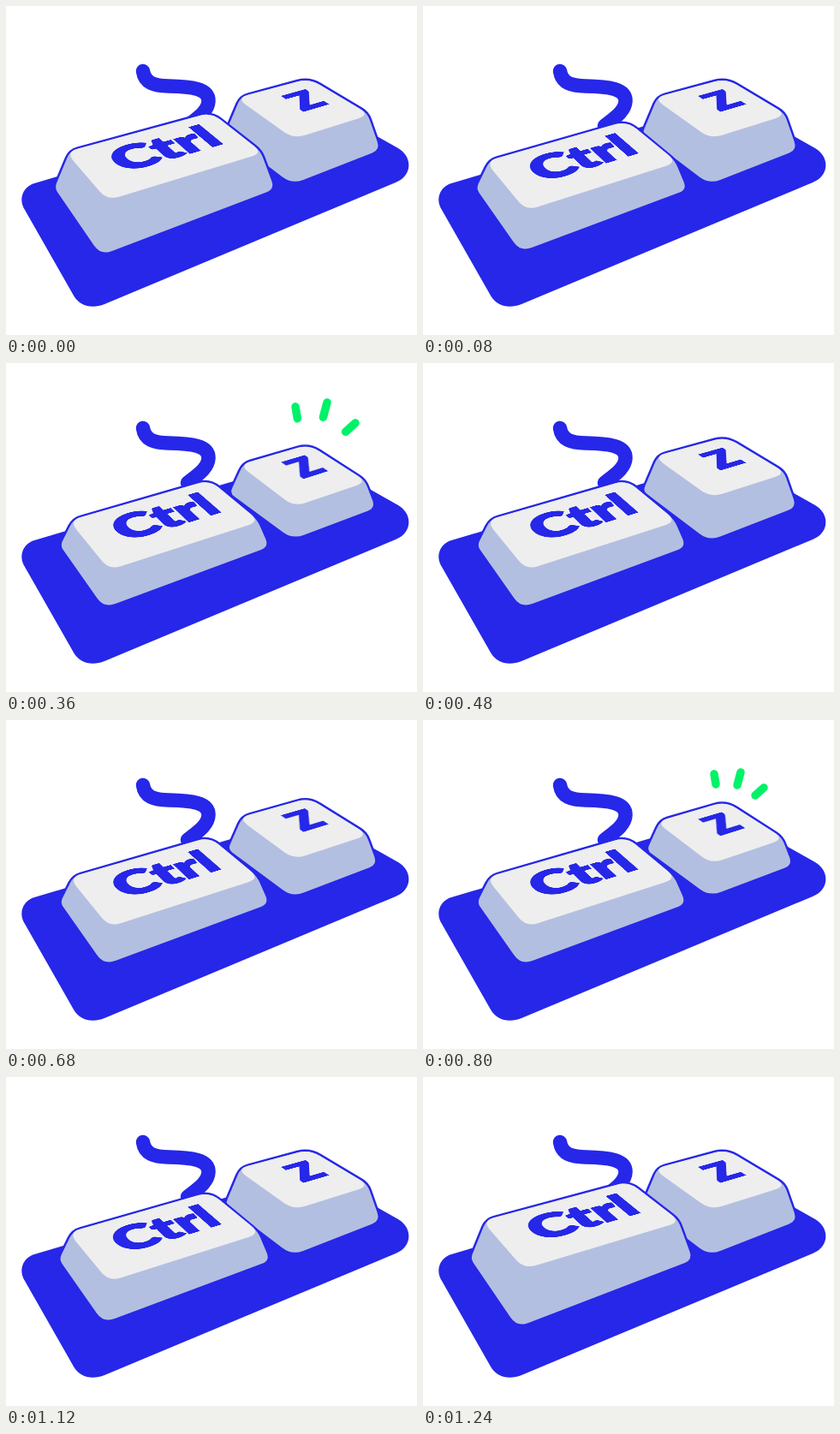
An HTML page for the animation above (1280 ms loop, 480x384 px).

```html
<!DOCTYPE html>
<html lang="en">
<head>
<meta charset="utf-8">
<title>Ctrl Z</title>
<style>
  html, body { margin: 0; width: 100%; height: 100%; overflow: hidden; background: #fff; }
  svg { position: absolute; left: 0; top: 0; }
  .base { fill: #2627e8; }
  .side { fill: #b3bfe1; stroke: #2627e8; stroke-width: 5; stroke-linejoin: round; paint-order: stroke; }
  .face { fill: #eee; }
  .cable { fill: none; stroke: #2627e8; stroke-width: 16.5; stroke-linecap: round; }
  .spark { stroke: #00f268; stroke-width: 9.5; stroke-linecap: round; }
  .label {
    position: absolute; left: 0; top: 0; box-sizing: border-box;
    transform-origin: 0 0; text-align: center; white-space: nowrap;
    font-family: Lato, sans-serif; font-weight: 900;
    color: #2627e8; -webkit-text-stroke: 2px #2627e8;
  }
  #ctrlLabel { width: 160px; height: 104px; padding-left: 10px; font-size: 65px; line-height: 85px; }
  #zLabel { width: 96px; height: 104px; padding-left: 22px; font-size: 56px; line-height: 82px; }
</style>
</head>
<body>
<svg id="stage" width="480" height="384" viewBox="0 0 480 384">
  <path class="base" d="M33 207 L350 113 Q365 109 380 122 L458 166 C475 176 475 198 455 206 L115 348 C100 354 86 350 79 338 L22 238 C14 225 20 211 33 207Z"/>
  <path class="cable" d="M160 76 C162 90 173 93 190 93.500 C216 94 237 96 236.500 111 C236 123 223 131 212 140"/>
</svg>
<div class="label" id="ctrlLabel">Ctrl</div>
<div class="label" id="zLabel">Z</div>
<script>
const LOOP = 1280, STEP = 40;
const stage = document.getElementById('stage');

function ramp(time, start, duration) {
  const k = Math.min(1, Math.max(0, (time - start) / duration));
  return k * k * (3 - 2 * k);
}

// Raised keys. Face corners: left, back, right, front. Foot corners: left, right, front.
const keys = [
  {
    label: document.getElementById('zLabel'), size: [96, 104],
    face: [[269, 107.5], [354, 84.6], [425, 127], [336, 155]],
    foot: [[256, 149], [437, 168], [334, 208]],
    center: [347, 182], drop: 13.5,
    press: t => ramp(t, 240, 120) - ramp(t, 360, 160) + ramp(t, 520, 280) - ramp(t, 800, 160)
  },
  {
    label: document.getElementById('ctrlLabel'), size: [160, 104],
    face: [[69, 168], [240, 122], [301, 169], [118, 224]],
    foot: [[55.5, 212], [315, 213.5], [110, 292]],
    center: [185, 225], drop: 17.6,
    press: t => ramp(t, -40, 160) - ramp(t, 1080, 160)
  }
];

const sparks = [
  { from: [342, 75], reach: [-2, -12] },
  { from: [367, 76], reach: [4, -15] },
  { from: [388, 88], reach: [10, -9] }
];
const bursts = [280, 800], burstSteps = 4;

function add(tag, className) {
  const node = document.createElementNS('http://www.w3.org/2000/svg', tag);
  node.setAttribute('class', className);
  return stage.appendChild(node);
}

for (const key of keys) {
  key.sideNode = add('path', 'side');
  key.faceNode = add('path', 'face');
}
for (const spark of sparks) spark.node = add('line', 'spark');

const mix = (a, b, k) => a + (b - a) * k;
const scaleAbout = (points, [cx, cy], sx, sy, dy = 0) =>
  points.map(([x, y]) => [mix(cx, x, sx), mix(cy, y, sy) + dy]);

// Closed polygon whose corners are cut back by the third value of each point.
function rounded(points) {
  const toward = (p, q) => {
    const k = p[2] / Math.hypot(q[0] - p[0], q[1] - p[1]);
    return mix(p[0], q[0], k).toFixed(2) + ' ' + mix(p[1], q[1], k).toFixed(2);
  };
  const count = points.length;
  return points.map((p, i) => {
    const before = points[(i + count - 1) % count], after = points[(i + 1) % count];
    return `${i ? 'L' : 'M'}${toward(p, before)} Q${p[0]} ${p[1]} ${toward(p, after)}`;
  }).join(' ') + 'Z';
}

// Perspective from a width by height box onto a four-cornered face.
function project([width, height], [[x0, y0], [x1, y1], [x2, y2], [x3, y3]]) {
  const dx1 = x1 - x2, dx2 = x3 - x2, sx = x0 - x1 + x2 - x3;
  const dy1 = y1 - y2, dy2 = y3 - y2, sy = y0 - y1 + y2 - y3;
  const det = dx1 * dy2 - dx2 * dy1;
  const g = (sx * dy2 - dx2 * sy) / det, h = (dx1 * sy - sx * dy1) / det;
  const across = [x1 - x0 + g * x1, y1 - y0 + g * y1, 0, g].map(v => v / width);
  const along = [x3 - x0 + h * x3, y3 - y0 + h * y3, 0, h].map(v => v / height);
  const all = [...across, ...along, 0, 0, 1, 0, x0, y0, 0, 1];
  return `matrix3d(${all.map(v => v.toFixed(8)).join(',')})`;
}

function drawKey(key, time) {
  const k = key.press(time);
  const face = scaleAbout(key.face, key.center, 1 - .04 * k, 1 + .03 * k, key.drop * k);
  const [footLeft, footRight, footFront] =
    scaleAbout(key.foot, key.center, 1 - .06 * k, 1 - .09 * k);
  const [left, back, right] = face;
  const corner = ([x, y], cut, dx = 0, dy = 0) => [x + dx, y + dy, cut];

  key.sideNode.setAttribute('d', rounded([
    corner(footLeft, 6), corner(left, 9, 5, -1.3), corner(back, 14),
    corner(right, 8, -3, -2), corner(footRight, 10), corner(footFront, 14)
  ]));
  key.faceNode.setAttribute('d', rounded(face.map(p => corner(p, 14))));
  key.label.style.transform = project(key.size, face);
}

// Each spark stretches outward, then its tail catches up with its tip.
function drawSparks(time) {
  const age = Math.min(...bursts.map(start => (time - start) / STEP).filter(n => n >= 0));
  const tail = Math.max(0, age - 1) * .85, tip = Math.min(2, age + 1);
  for (const { node, from, reach } of sparks) {
    node.style.display = age < burstSteps ? '' : 'none';
    if (age >= burstSteps) continue;
    [tail, tip].forEach((k, i) => {
      node.setAttribute('x' + (i + 1), from[0] + reach[0] * k);
      node.setAttribute('y' + (i + 1), from[1] + reach[1] * k);
    });
  }
}

const began = performance.now();
function draw() {
  const elapsed = (performance.now() - began) % LOOP;
  const time = Math.floor(elapsed / STEP) * STEP;
  keys.forEach(key => drawKey(key, time));
  drawSparks(time);
  requestAnimationFrame(draw);
}
draw();
</script>
</body>
</html>
```
